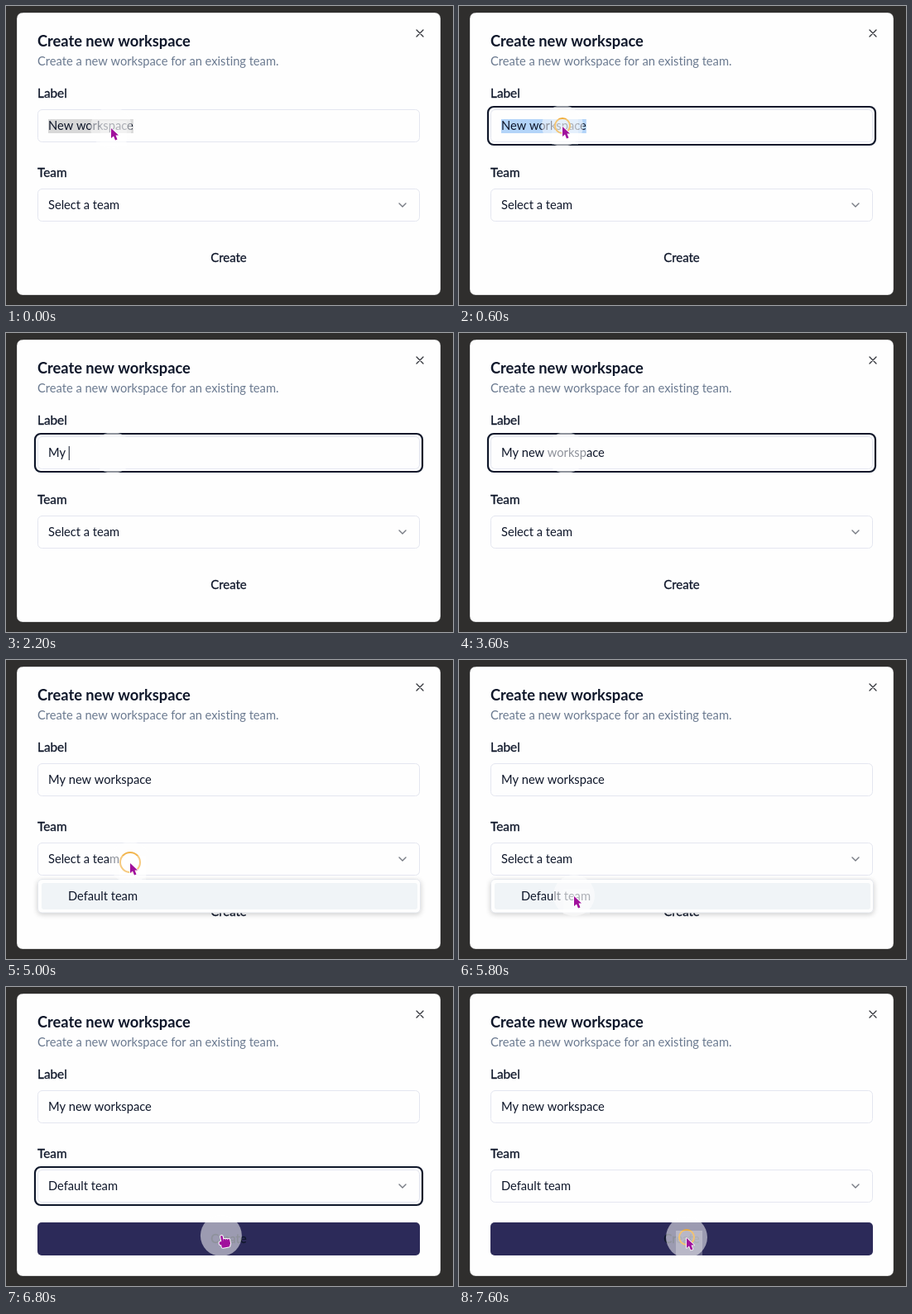
Write an HTML page with a canvas that moves like this. It is 540 px wide and 362 px high and loops after 7.8 s.

```html
<!DOCTYPE html>
<html lang="en">
<head>
<meta charset="utf-8">
<title>Create new workspace</title>
<style>
  html, body { margin: 0; width: 100%; height: 100%; overflow: hidden; background: #2f2e2d; }
  canvas { display: block; }
</style>
</head>
<body>
<canvas id="stage" width="540" height="362"></canvas>
<script>
const c = document.getElementById('stage').getContext('2d');
const LOOP = 7800, STEP = 200;
const INK = '#0f172a', PAPER = '#fefefe', LINE = '#e4e6f0', PURPLE = '#a0109c';
const CLICK = { label: 580, select: 4920, option: 6000, create: 7580 };
const ARROW = new Path2D('M0 1V13L3 10.5 5 15.5 7.5 14.5 5.5 9.5H9Z');

const between = (t, a, b) => t >= a && t < b;
const clamp = k => Math.min(1, Math.max(0, k));
const easeOut = k => 1 - (1 - clamp(k)) ** 2;

// Each move adds its eased offset to the resting place.
function pointerAt(t) {
  const moves = [
    { start: 200, time: 400, dx: -2, dy: -2 },
    { start: 1000, time: 400, dx: 4, dy: 0 },
    { start: 4200, time: 600, dx: 21, dy: 100 },
    { start: 5200, time: 600, dx: -11, dy: 40 },
    { start: 6000, time: 1200, dx: 136, dy: 18 }
  ];
  return moves.reduce(([x, y], m) => {
    const k = easeOut((t - m.start) / m.time);
    return [x + m.dx * k, y + m.dy * k];
  }, [127, 147]);
}

function labelText(t) {
  if (t < 1400) return 'New workspace';
  const count = t < 2200 ? Math.min(2, (t - 1200) / STEP) : 3 + 13 * (t - 2200) / 1400;
  return 'My new workspace'.slice(0, count);
}

function box(x, y, w, h, r, fill, stroke, width = 1) {
  c.beginPath();
  c.roundRect(x, y, w, h, r);
  if (fill) { c.fillStyle = fill; c.fill(); }
  if (stroke) { c.strokeStyle = stroke; c.lineWidth = width; c.stroke(); }
}

function circle(x, y, r) {
  c.beginPath();
  c.arc(x, y, r, 0, 2 * Math.PI);
}

function icon(path, color, width) {
  c.strokeStyle = color;
  c.lineWidth = width;
  c.lineCap = c.lineJoin = 'round';
  c.stroke(new Path2D(path));
}

function setFont(size = 14.7, weight = 400) {
  c.font = `${weight} ${size}px Lato, "Open Sans", sans-serif`;
  c.letterSpacing = '-0.02px'; // turns ligatures off
}

function text(str, x, y, { size, weight, color = INK, medium, align = 'left' } = {}) {
  setFont(size, weight);
  c.textAlign = align;
  c.fillStyle = c.strokeStyle = color;
  c.fillText(str, x, y);
  if (medium) {
    c.lineWidth = .3;
    c.strokeText(str, x, y);
  }
}

function field(y, focused) {
  if (focused) box(35, y - 3, 468, 46, 7, PAPER, INK, 2.2);
  box(38.5, y + .5, 461, 39, 5, PAPER, LINE);
}

function labelField(t) {
  field(125, between(t, CLICK.label, 4800));
  const value = labelText(t);
  setFont();
  const width = c.measureText(value).width;
  if (t < 1400) {
    c.fillStyle = t < CLICK.label ? '#d8d8d8' : '#b3d4f8';
    c.fillRect(51, 137, width, 17);
  }
  text(value, 51, 150);
  if (between(t, 1400, 3600)) {
    c.fillStyle = INK;
    c.fillRect(51 + width, 137, 1, 17);
  }
}

function button(t) {
  c.globalAlpha = t < 6400 ? 0 : t < 6600 ? .17 : 1;
  box(38, 285, 462, 40, 5, '#2c2a59');
  c.globalAlpha = 1;
  text('Create', 269, 309.5, { size: 15, align: 'center', medium: true });
}

function menu() {
  c.save();
  c.shadowColor = 'rgba(0,0,0,.2)';
  c.shadowBlur = 6;
  c.shadowOffsetY = 2;
  box(38, 265, 463, 41, 5, PAPER);
  c.restore();
  box(38.5, 265.5, 462, 40.5, 5, null, '#e4e7ec');
  box(43, 270, 454, 32, 3, '#f0f4f7');
  text('Default team', 75, 290.5);
}

function arrow() {
  c.fillStyle = 'rgba(255,255,255,.28)';
  c.fillRect(-13, -8, 32, 31);
  icon(ARROW, '#fff', 1.6);
  c.fillStyle = PURPLE;
  c.fill(ARROW);
}

function hand() {
  c.rotate(-.2);
  for (const [grow, color] of [[1, '#fff'], [0, PURPLE]]) {
    const part = (x, y, w, h) => box(x - grow, y - grow, w + 2 * grow, h + 2 * grow, 1.5 + grow, color);
    part(-1, 0, 2.6, 11);
    for (let i = 1; i < 4; i++) part(-1 + i * 2.5, 4 + i * .6, 2.6, 7);
    part(-4, 7, 4, 4);
    part(-2, 7, 10, 8);
  }
}

function pointer(t) {
  const [x, y] = pointerAt(t);
  c.fillStyle = 'rgba(255,255,255,.53)';
  circle(x, y, 25);
  c.fill();

  for (const start of Object.values(CLICK)) {
    const age = t - start;
    if (!between(age, 0, 600)) continue;
    c.strokeStyle = `rgba(240,172,55,${1 - age / 730})`;
    c.lineWidth = 2;
    circle(...pointerAt(start), 8 + age * .05);
    c.stroke();
  }

  if (between(t, 1400, 4200)) return; // hidden while typing
  c.save();
  c.translate(x, y);
  between(t, 6400, CLICK.create) ? hand() : arrow();
  c.restore();
}

function draw(t) {
  c.fillStyle = '#2f2e2d';
  c.fillRect(0, 0, 540, 362);
  box(13, 8, 512, 342, 7, PAPER, 'rgba(48,48,46,.3)');
  icon('M496 29l8 8m0-8l-8 8', '#34363c', 1.3);

  text('Create new workspace', 38, 48.5, { size: 18.3, weight: 700 });
  text('Create a new workspace for an existing team.', 38, 72, { color: '#6b7a90' });
  text('Label', 38, 110.5, { size: 15.4, medium: true });
  text('Team', 38, 206.5, { size: 15.4, medium: true });

  labelField(t);
  field(221, between(t, 6200, CLICK.create));
  text(t < 6200 ? 'Select a team' : 'Default team', 51, 246);
  icon('M475 239l4 4 4-4', '#777b84', 1.4);

  button(t);
  if (between(t, CLICK.select, 6200)) menu();
  pointer(t);
}

function tick() {
  const t = performance.now() % LOOP;
  draw(Math.floor(t / STEP) * STEP);
  requestAnimationFrame(tick);
}
tick();
</script>
</body>
</html>
```
